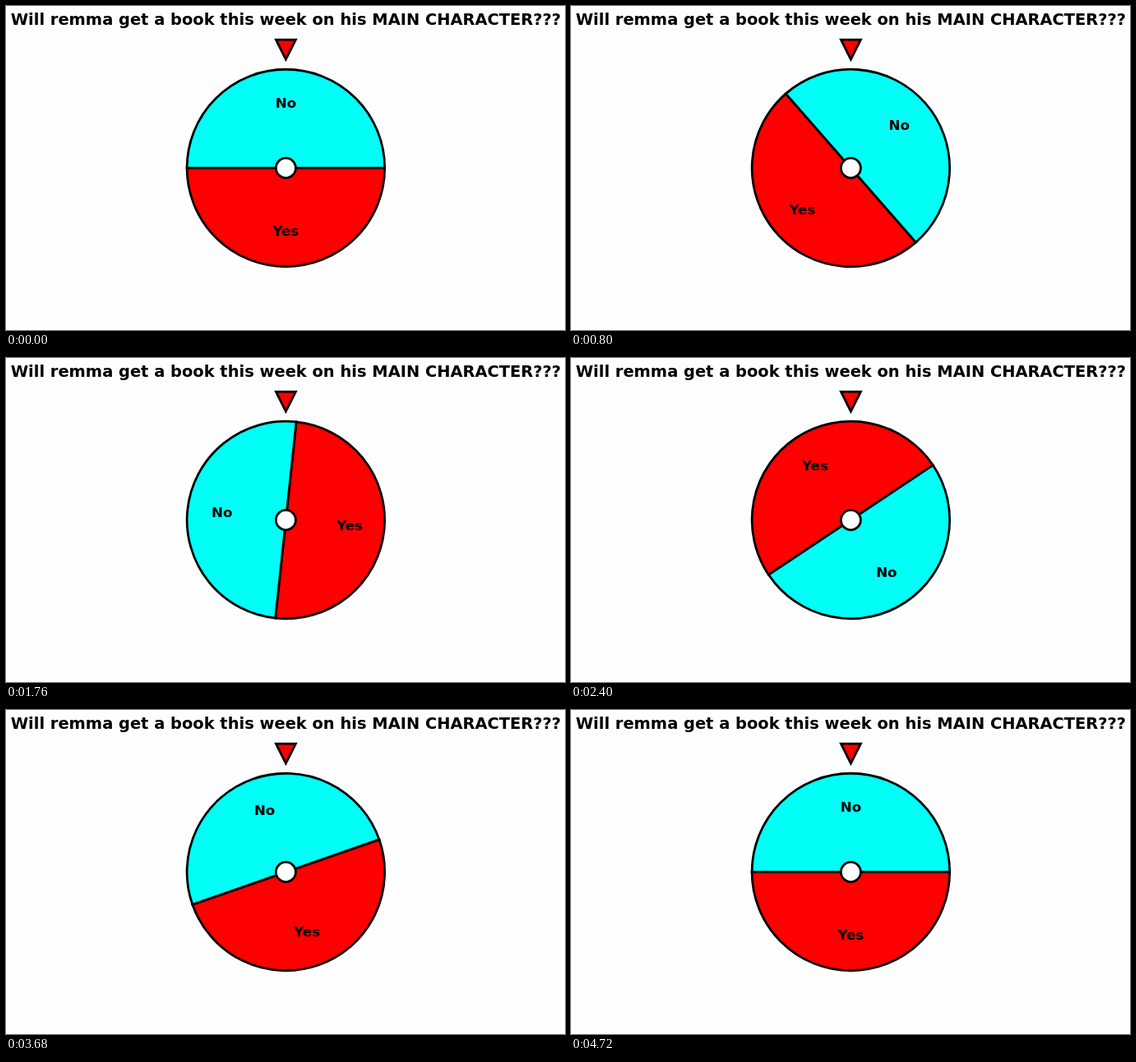
Recreate the animation shown at these times as an HTML page. Size 680 px wide and 395 px high, loop 4800 ms.

```html
<!DOCTYPE html>
<html lang="en">
<head>
<meta charset="utf-8">
<title>Spinning wheel</title>
<style>
  html, body { margin: 0; width: 100%; height: 100%; overflow: hidden; background: #fefefe; }
  svg { display: block; }
  text { font-family: "DejaVu Sans", sans-serif; font-weight: bold; text-anchor: middle; }
  .label { font-size: 16.67px; }
  .line { stroke: #000; stroke-width: 2.78; }
</style>
</head>
<body>
<svg width="680" height="395" viewBox="0 0 680 395">
  <text x="340.4" y="23" font-size="19.44">Will remma get a book this week on his MAIN CHARACTER???</text>
  <g id="wheel" class="line">
    <path fill="#f00" d="M220.1 197.5A120.3 120.3 0 0 0 460.7 197.5Z"/>
    <path fill="#00fff6" d="M220.1 197.5A120.3 120.3 0 0 1 460.7 197.5Z"/>
  </g>
  <text id="yes" class="label">Yes</text>
  <text id="no" class="label">No</text>
  <circle class="line" cx="340.4" cy="197.5" r="12.03" fill="#fefefe"/>
  <path class="line" fill="#f00" d="M340.4 65.2L328.4 41.1H352.4Z"/>
</svg>
<script>
  const CX = 340.4, CY = 197.5, LABEL_R = 78.2;
  const STEP = 80, STEPS = 60, TURNS = 5;
  const [wheel, yes, no] = ["wheel", "yes", "no"].map(id => document.getElementById(id));

  // Labels travel with their half but stay upright.
  function place(label, deg) {
    const a = deg * Math.PI / 180;
    label.setAttribute("x", (CX + LABEL_R * Math.sin(a)).toFixed(2));
    label.setAttribute("y", Math.round(CY - LABEL_R * Math.cos(a) + 4.7));
  }

  // Clockwise spin with a cubic ease-out, advanced in fixed steps.
  function draw(ms) {
    const step = Math.floor(ms / STEP) % STEPS;
    const left = 1 - step / (STEPS - 1);
    const deg = 360 * TURNS * (1 - left ** 3);
    wheel.setAttribute("transform", `rotate(${deg} ${CX} ${CY})`);
    place(no, deg);
    place(yes, deg + 180);
  }

  let start;
  function tick(now) {
    start ??= now;
    draw(Math.max(0, now - start));
    requestAnimationFrame(tick);
  }
  draw(0);
  requestAnimationFrame(tick);
</script>
</body>
</html>
```
